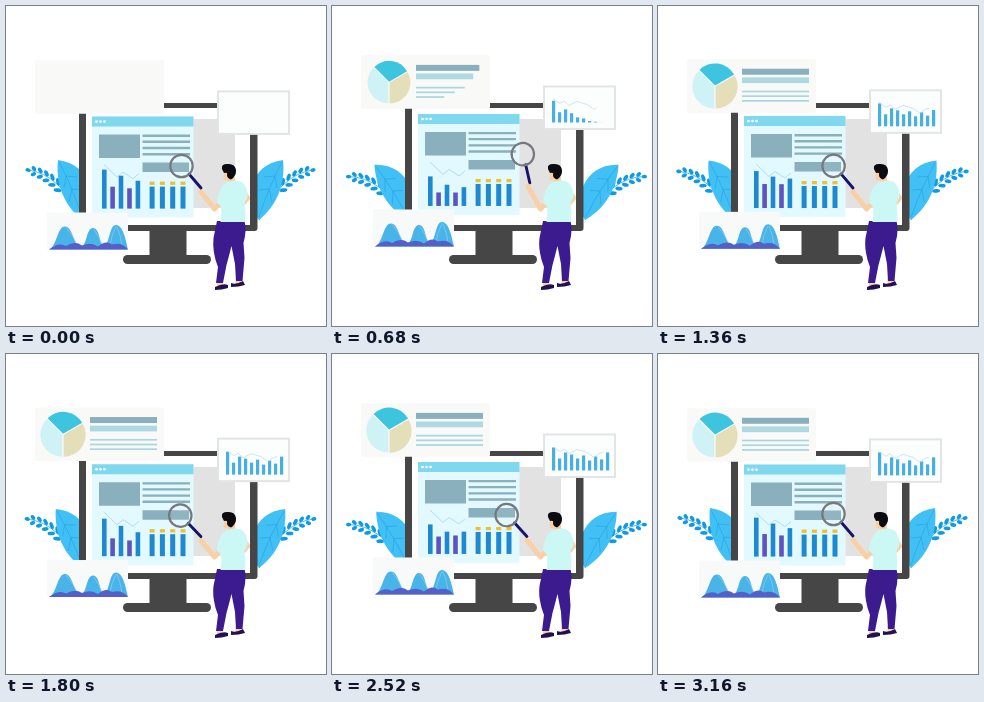
Write an HTML page that moves like this. It is 320 px wide and 320 px high and loops after 3200 ms.

```html
<!DOCTYPE html>
<html lang="en">
<head>
<meta charset="utf-8">
<title>Data analysis</title>
<style>
html, body { margin: 0; width: 100%; height: 100%; overflow: hidden; background: #fff; }
svg { display: block; width: 100vw; height: 100vh; }
</style>
</head>
<body>
<svg viewBox="0 0 320 320" xmlns="http://www.w3.org/2000/svg">
  <defs>
    <g id="leafShape">
      <path d="M52 154C50 172 54 196 76 214C92 196 86 158 52 154Z" fill="#41c0f5"/>
      <path d="M53 156Q66 180 76 211M60 170L58 182M66 183L63 196M60 170L71 171M66 183L76 184" fill="none" stroke="#2b9fe0" stroke-width=".6"/>
    </g>
    <g id="branchShape"></g>
    <clipPath id="trendClip"><rect id="trendMask" x="220" y="0" height="44"/></clipPath>
  </defs>

  <g id="foliage">
    <use class="branch" href="#branchShape"/>
    <use class="leaf" href="#leafShape"/>
    <g transform="matrix(-1 0 0 1 329 0)">
      <use class="branch" href="#branchShape"/>
      <use class="leaf" href="#leafShape"/>
    </g>
  </g>

  <g id="monitor" fill="#464646">
    <path d="M143.500 224H180.500V250H143.500Z"/>
    <rect x="117" y="249" width="88" height="9" rx="4.500"/>
    <rect x="73" y="97" width="178.500" height="128" rx="3"/>
    <path d="M80 102H244V219H80Z" fill="#fff"/>
    <path d="M187 113H229V202H187Z" fill="#e2e2e2"/>
  </g>

  <g id="page">
    <path d="M86 0H187.500V101H86Z" fill="#e2f9ff"/>
    <path d="M86 0H187.500V10H86Z" fill="#80d8ef"/>
    <g fill="#fff"><circle cx="90.500" cy="5" r="1.300"/><circle cx="94.500" cy="5" r="1.300"/><circle cx="98.500" cy="5" r="1.300"/></g>
    <g fill="#8aafbd">
      <path d="M93 18H134V41.500H93Z"/>
      <path d="M136.500 18H184V20.400H136.500ZM136.500 24H184V26.400H136.500ZM136.500 30.200H184V32.600H136.500ZM136.500 36.400H184V38.800H136.500ZM136.500 46H183V55.500H136.500Z"/>
    </g>
    <path d="M98 48L111 60.500L117 55.500L127 62L133 57" fill="none" stroke="#a9d5ea" stroke-width=".8"/>
    <g id="pulseBars"></g>
    <g id="stackBars"></g>
  </g>

  <g id="report">
    <rect x="29" width="129" height="53.500" rx="2" fill="#f9f9f8"/>
    <g id="pie"></g>
    <g id="rows"></g>
  </g>

  <g id="columns">
    <rect x="212" y="1" width="71" height="42.500" fill="#fcfdfd" stroke="#e3e4e5" stroke-width="2"/>
    <g id="columnBars" fill="#48afe2"></g>
    <path d="M221 13.500L228 18L232 15.500L237 20L245 16L255 19L262 24L267 20L271 19" fill="none" stroke="#b5ddf0" stroke-width=".7" clip-path="url(#trendClip)"/>
  </g>

  <g id="hills">
    <rect x="41" width="81" height="37" fill="#f8f9f9"/>
    <path d="M43 37C51 34 51 14 59 14S67 33 75 34C81 34 80 15.500 87 15.500S93 32 98 33C104 32 103 12.500 110 12.500S120 28 122 37Z" fill="#49b4e8"/>
    <path d="M60 15Q69 25 71 34M88 17Q94 25 96 33M110 14Q105 24 104 33M111 14Q115 24 116 33" fill="none" stroke="#93d5f2" stroke-width=".6"/>
    <path d="M43 37Q53 29 60 33.500Q69 28 76 33Q85 29 92 34Q100 27 106 32Q116 29 122 37Z" fill="#555fc8"/>
  </g>

  <g id="person">
    <path d="M237 184Q244 188 244 193L239 199L236 195Z" fill="#f9d0a6"/>
    <path d="M211 274H217V281H211ZM229.500 272H235V279H229.500Z" fill="#f9d0a6"/>
    <path d="M211 215H238.500Q241 224 237.500 237L238.500 252L236.500 275H230L229 258L225.500 240Q223 250 220.500 259L217 277H210L212 261Q206 246 207.500 232Z" fill="#3c1b8e"/>
    <path d="M209 281Q217 277 222 279L222 282Q216 284 209 284ZM225 277Q230 279 237 275L239 279Q233 281 225 281Z" fill="#211052"/>
    <path d="M218 165L217.500 173Q219 175.500 222 174L222 180L230 179L228 166Z" fill="#f9d0a6"/>
    <path id="arm" fill="none" stroke="#f9d0a6" stroke-width="5" stroke-linecap="round" stroke-linejoin="round"/>
    <path d="M221 176Q233 172 238 178Q242 184 241.500 191L238.500 197Q240 207 239 216H214.500Q216 207 215 200L211 197Q212 181 221 176Z" fill="#cbf8f4"/>
    <path d="M216 163Q215 158 221 158Q229 157 230 164Q230.500 170 225 173.500Q221 172 221 169Q222 166 218 167Z" fill="#0c0b12"/>
  </g>

  <g id="glass">
    <path d="M183 168L195 182" stroke="#17126a" stroke-width="2.900" stroke-linecap="round"/>
    <circle cx="175.500" cy="160" r="11.200" fill="#e8f3f8" fill-opacity=".08" stroke="#77777d" stroke-width="2.200"/>
  </g>
</svg>
<script>
const LOOP = 3200, BOB = 1600, STEP = 40, GROW = 800, STAGGER = 80;
const $ = id => document.getElementById(id);
const set = (el, name, value) => el.setAttribute(name, value);

function add(parent, tag, attrs) {
  const el = document.createElementNS("http://www.w3.org/2000/svg", tag);
  for (const name in attrs) set(el, name, attrs[name]);
  return parent.appendChild(el);
}

const clamp = u => Math.min(1, Math.max(0, u));
const ease = u => (1 - Math.cos(Math.PI * clamp(u))) / 2;
const wave = (t, peak = 0) => Math.cos(2 * Math.PI * (t - peak) / BOB);
const grown = (t, index) => ease((t - index * STAGGER) / GROW);

function keyed(t, keys) {
  const i = keys.findIndex(key => key[0] > t);
  const [t0, v0] = keys[i - 1], [t1, v1] = keys[i];
  return v0 + (v1 - v0) * ease((t - t0) / (t1 - t0));
}

function rotated(x, y, cx, cy, degrees) {
  const a = degrees * Math.PI / 180, c = Math.cos(a), s = Math.sin(a);
  return [cx + (x - cx) * c - (y - cy) * s, cy + (x - cx) * s + (y - cy) * c];
}

// Twig: leaflets in spreading pairs along an arched stem
const twig = $("branchShape"), twigColor = "#0f9ae6";
const leaflet = (cx, cy, rx, tilt) =>
  add(twig, "ellipse", { cx, cy, rx, ry: 1.9, fill: twigColor, transform: `rotate(${tilt} ${cx} ${cy})` });
add(twig, "path", { d: "M22 164Q54 168 76 214", fill: "none", stroke: twigColor, "stroke-width": .7 });
leaflet(22, 164, 2.6, 10);
for (let i = 0; i < 5; i++) {
  const u = 0.11 + i * 0.105;
  const x = 22 + 64 * u - 10 * u * u, y = 164 + 8 * u + 42 * u * u;
  const size = 2.8 + i * 0.3, slope = 15 + i * 7;
  leaflet(x - 1, y - 2.8 - i * 0.35, size, slope + 35);
  leaflet(x - 1.5, y + 2.8 + i * 0.35, size, slope - 35);
}

// x, mean height, swing, time of the peak
const pulses = [
  [96, 34, 5, 0], [104.3, 18.5, 5.5, -230], [112.7, 27, 6, -50],
  [121.2, 18, 6, -300], [129.6, 24, 5.5, -200]
].map(([x, mean, swing, peak], i) => ({
  mean, swing, peak,
  el: add($("pulseBars"), "rect", { x, width: 4.6, fill: i % 2 ? "#5b55c2" : "#1f89cf" })
}));

for (let i = 0; i < 4; i++) {
  const x = 143.6 + i * 10.3;
  add($("stackBars"), "rect", { x, y: 65, width: 5, height: 3.3, fill: "#edc02e" });
  add($("stackBars"), "rect", { x, y: 70, width: 5, height: 22, fill: "#1f89cf" });
}

function slice(from, to, fill) {
  const point = deg => rotated(0, -22, 0, 0, deg).join(" ");
  const shift = rotated(0, -0.7, 0, 0, (from + to) / 2).join(" ");
  add($("pie"), "path", { d: `M0 0L${point(from)}A22 22 0 0 1 ${point(to)}Z`, fill, transform: `translate(${shift})` });
}
slice(60, 180, "#e5dfb9");
slice(180, 315, "#cff2f6");
slice(-45, 60, "#3dc5e0");

const rows = [[9.6, 6, "#8aafbd"], [18.2, 5.8, "#afd9e1"], [31.5, 1.7, "#a9d6df"], [36.2, 1.7, "#a9d6df"], [40.9, 1.7, "#a9d6df"]]
  .map(([y, height, fill]) => add($("rows"), "rect", { x: 84, y, height, fill }));

const columns = [23, 12, 18, 16, 12, 15, 10, 14, 11, 18].map((full, i) => ({
  full, el: add($("columnBars"), "rect", { x: 220 + i * 6, width: 3.2 })
}));

const leafKeys = [[0, 0], [640, -9.5], [BOB, 0]];
const glassKeys = [[0, 0], [440, 28], [640, 28], [1400, 0], [2100, -4.7], [2850, 0], [LOOP, 0]];
const shiftY = (id, y) => set($(id), "transform", `translate(0 ${y})`);

function draw(t) {
  const bob = wave(t);
  shiftY("report", 51.6 + 2.6 * bob);
  shiftY("columns", 81.8 + 2.6 * bob);
  shiftY("hills", 204.9 + 1.6 * bob);
  shiftY("page", 109.2 + 1.4 * bob);

  const leafTurn = keyed(t % BOB, leafKeys), twigTurn = -3.5 * (1 - bob);
  document.querySelectorAll(".leaf").forEach(el => set(el, "transform", `rotate(${leafTurn} 76 214)`));
  document.querySelectorAll(".branch").forEach(el => set(el, "transform", `rotate(${twigTurn} 76 214)`));

  for (const { el, mean, swing, peak } of pulses) {
    const height = mean + swing * wave(t, peak);
    set(el, "y", 92 - height);
    set(el, "height", height);
  }

  set($("pie"), "transform", `translate(57 27) scale(${grown(t, 0)})`);
  rows.forEach((row, i) => set(row, "width", 67 * grown(t, i)));
  columns.forEach(({ el, full }, i) => {
    const height = full * grown(t, i);
    set(el, "y", 37 - height);
    set(el, "height", height);
  });
  set($("trendMask"), "width", 52 * grown(t, 1));

  const turn = keyed(t, glassKeys);
  set($("glass"), "transform", `rotate(${turn} 207 185)`);
  const hand = rotated(195, 186, 207, 185, turn);
  set($("arm"), "d", `M${hand}L208.5 203L215 196`);
}

const start = performance.now();
function tick() {
  const t = (performance.now() - start) % LOOP;
  draw(Math.floor(t / STEP) * STEP);
  requestAnimationFrame(tick);
}
draw(0);
requestAnimationFrame(tick);
</script>
</body>
</html>
```
